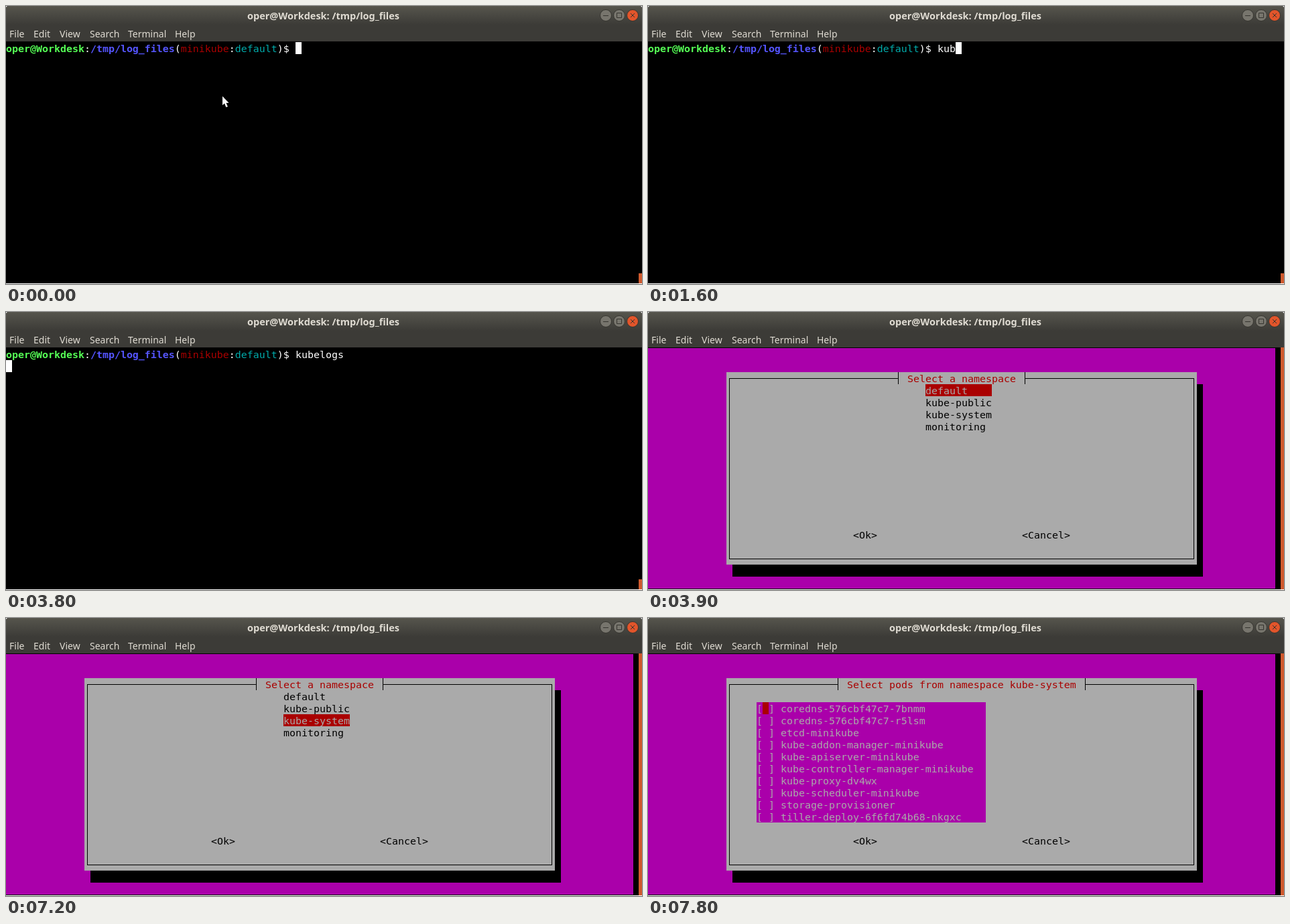
Animation of 949 by 416 pixels, one loop 8 s. Source, as an HTML page:

```html
<!DOCTYPE html>
<html lang="en">
<head>
<meta charset="utf-8">
<title>Terminal</title>
<style>
  html, body { margin: 0; width: 100%; height: 100%; overflow: hidden; background: #fff; }
  #win {
    position: relative; width: 949px; height: 415px; overflow: hidden;
    background: #000; border-radius: 4px 4px 0 0;
  }
  #win div, #win svg { position: absolute; }

  /* window frame */
  .head {
    left: 0; top: 0; width: 949px; height: 53px;
    background: linear-gradient(#56554d, #3c3b37 28px);
    color: #dfdbd2; font: 14px/20px "Noto Sans", sans-serif;
  }
  .title { top: 4px; width: 947px; text-align: center; font-weight: bold; font-size: 14.5px; }
  .menu div { top: 32px; left: var(--x); white-space: nowrap; }

  /* 9 x 18 character grid: --c is the column, --r the row */
  .cell {
    left: calc(var(--c, 0) * 9px); top: calc(54px + var(--r, 0) * 18px);
    box-sizing: border-box; height: 18px; padding-top: 1px;
    font: 14.95px/18px "DejaVu Sans Mono", monospace; white-space: pre;
  }
  .shell { color: #fff; }
  .shell b:first-child { color: #5f5; }
  .path { color: #55f; }
  .ctx { color: #a00; }
  .ns { color: #0aa; }
  .thumb { left: 944px; width: 5px; background: #cf5a2e; }

  #typed { overflow: hidden; color: #fff; }
  #caret { width: 9px; background: #fff; }

  /* dialogs */
  .screen { left: 0; top: 53px; width: 949px; height: 361px; background: #000; }
  .screen .fill { left: 0; top: 1px; width: 936px; height: 360px; background: #a0a; }
  .screen .thumb { top: 0; height: 361px; }
  .page { left: 0; top: 0; width: 949px; height: 415px; }
  .box { left: 117px; top: 90px; width: 702px; height: 288px; background: #aaa; box-shadow: 9px 18px #000; }
  .rim { left: 121px; top: 99px; width: 692px; height: 269px; border: 1px solid #000; }
  .name {
    margin-left: -14px; padding: 1px 13px 0; background: #aaa; color: #a00;
    border: solid #000; border-width: 0 1px;
  }
  .pods { width: 342px; height: 180px; background: #a0a; color: #aaa; }
  .mark { width: 9px; background: #a00; }
  .item { width: 99px; }

  /* timeline */
  #typed, #caret, #arrow, .page, .item { animation: 8s step-end infinite; }
  #typed { animation-name: type; }
  #caret { animation-name: move, blink; }
  #arrow { animation-name: point; }
  #spaces { animation-name: spaces; }
  #podlist { animation-name: podlist; }
  .item.s0 { animation-name: pick0; }
  .item.s1 { animation-name: pick1; }
  .item.s2 { animation-name: pick2; }

  @keyframes type {
    0% { width: 0 } 17.5% { width: 9px } 18.75% { width: 18px } 20% { width: 27px }
    22.5% { width: 36px } 25% { width: 45px } 26.25% { width: 54px } 27.5% { width: 63px }
    36.25%, 100% { width: 72px }
  }
  @keyframes move {
    0% { transform: translate(432px, 0) } 17.5% { transform: translate(441px, 0) }
    18.75% { transform: translate(450px, 0) } 20% { transform: translate(459px, 0) }
    22.5% { transform: translate(468px, 0) } 25% { transform: translate(477px, 0) }
    26.25% { transform: translate(486px, 0) } 27.5% { transform: translate(495px, 0) }
    36.25% { transform: translate(504px, 0) } 47.5%, 100% { transform: translate(0, 18px) }
  }
  @keyframes blink {
    0%, 15%, 43.75%, 100% { opacity: 1 }
    7.5%, 40% { opacity: 0 }
  }
  @keyframes point {
    0% { transform: translate(323px, 135px); visibility: visible }
    6.25% { transform: translate(326px, 133px); visibility: visible }
    17.5%, 100% { transform: translate(326px, 133px); visibility: hidden }
  }
  @keyframes spaces { 0%, 95%, 100% { visibility: hidden } 48.75% { visibility: visible } }
  @keyframes podlist { 0% { visibility: hidden } 97.5%, 100% { visibility: visible } }
  @keyframes pick0 { 0% { background: #a00; color: #aaa } 70%, 100% { background: #aaa; color: #000 } }
  @keyframes pick1 { 0%, 90%, 100% { background: #aaa; color: #000 } 70% { background: #a00; color: #aaa } }
  @keyframes pick2 { 0% { background: #aaa; color: #000 } 90%, 100% { background: #a00; color: #aaa } }
</style>
</head>
<body>
<div id="win">
  <div class="head">
    <div class="title">oper@Workdesk: /tmp/log_files</div>
    <div class="menu">
      <div style="--x:5px">File</div>
      <div style="--x:41px">Edit</div>
      <div style="--x:80px">View</div>
      <div style="--x:125px">Search</div>
      <div style="--x:182px">Terminal</div>
      <div style="--x:252px">Help</div>
    </div>
    <svg style="left:885px;top:4px" width="62" height="20" fill="none" stroke="#35342f">
      <circle cx="10" cy="10" r="8.5" fill="#77756d"/>
      <circle cx="30" cy="10" r="8.5" fill="#77756d"/>
      <circle cx="50" cy="10" r="8.5" fill="#e2552b"/>
      <path d="M6 10.5h8M26.5 6.5h7v7h-7zM47 7l6 6m0-6l-6 6"/>
    </svg>
  </div>

  <div class="cell shell"><b>oper@Workdesk</b>:<b class="path">/tmp/log_files</b>(<span class="ctx">minikube</span>:<span class="ns">default</span>)$ </div>
  <div class="cell" id="typed" style="--c:48">kubelogs</div>
  <div class="cell" id="caret"></div>
  <div class="thumb" style="top:400px;height:15px"></div>
  <svg id="arrow" style="left:0;top:0" width="10" height="18">
    <path d="M0 0V13.6L3 10.8 5.4 16.6 7.9 15.5 5.5 9.9H9.5Z" fill="#fff"/>
  </svg>

  <div class="page" id="spaces">
    <div class="screen"><div class="fill"></div><div class="thumb"></div></div>
    <div class="box"></div>
    <div class="rim"></div>
    <div class="cell name" style="--c:43;--r:2">Select a namespace</div>
    <div class="cell item s0" style="--c:46;--r:3">default</div>
    <div class="cell item s1" style="--c:46;--r:4">kube-public</div>
    <div class="cell item s2" style="--c:46;--r:5">kube-system</div>
    <div class="cell" style="--c:46;--r:6">monitoring</div>
    <div class="cell" style="--c:34;--r:15">&lt;Ok&gt;</div>
    <div class="cell" style="--c:62;--r:15">&lt;Cancel&gt;</div>
  </div>

  <div class="page" id="podlist">
    <div class="screen"><div class="fill"></div><div class="thumb"></div></div>
    <div class="box"></div>
    <div class="rim"></div>
    <div class="cell name" style="--c:33;--r:2">Select pods from namespace kube-system</div>
    <div class="cell pods" style="--c:18;--r:4">[ ] coredns-576cbf47c7-7bnmm
[ ] coredns-576cbf47c7-r5lsm
[ ] etcd-minikube
[ ] kube-addon-manager-minikube
[ ] kube-apiserver-minikube
[ ] kube-controller-manager-minikube
[ ] kube-proxy-dv4wx
[ ] kube-scheduler-minikube
[ ] storage-provisioner
[ ] tiller-deploy-6f6fd74b68-nkgxc</div>
    <div class="cell mark" style="--c:19;--r:4"></div>
    <div class="cell" style="--c:34;--r:15">&lt;Ok&gt;</div>
    <div class="cell" style="--c:62;--r:15">&lt;Cancel&gt;</div>
  </div>
</div>
</body>
</html>
```
